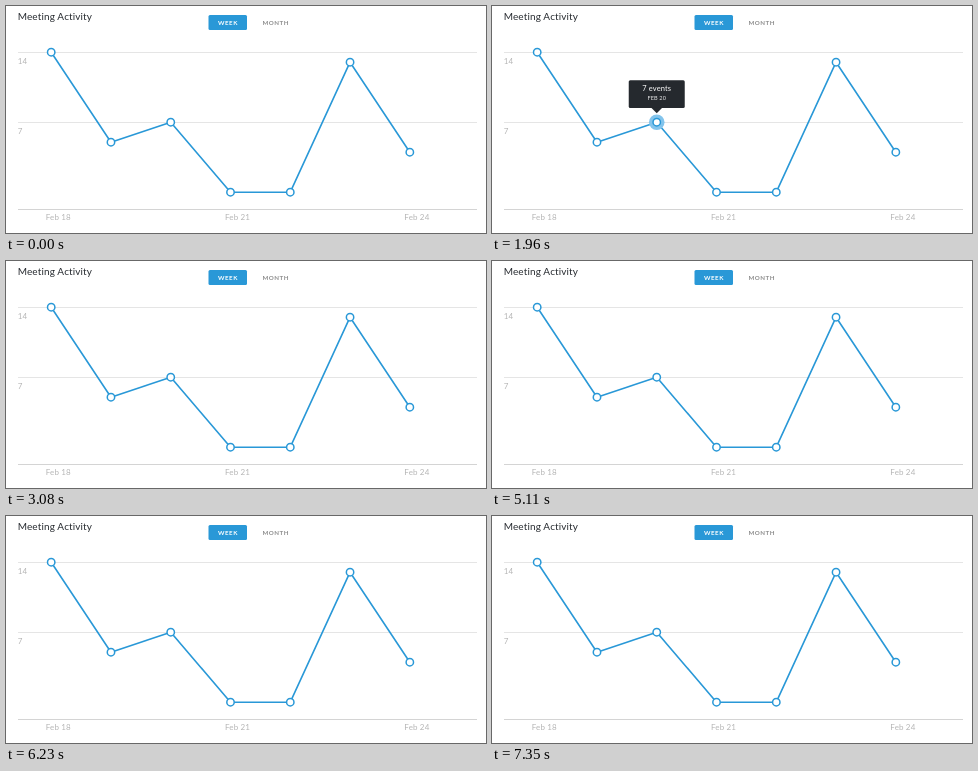
Animation of 480 by 227 pixels, one loop 8000 ms. Source, as an HTML page:

```html
<!DOCTYPE html>
<html lang="en">
<head>
<meta charset="utf-8">
<title>Meeting Activity</title>
<style>
  html, body { margin: 0; width: 100%; height: 100%; overflow: hidden; background: #fff; }
  svg { display: block; width: 480px; height: 227px; font-family: Lato, "Open Sans", sans-serif; }
  .title { font-size: 10px; fill: #282c31; letter-spacing: .13px; }
  .label { font-size: 8px; fill: #b5b5b5; letter-spacing: .15px; }
  .tab { font-size: 6.2px; font-weight: 700; text-anchor: middle; letter-spacing: .5px; }
  .grid { stroke: #e5e5e5; }
  .line { fill: none; stroke: #2998d7; stroke-width: 1.6; stroke-linejoin: round; }
  .dot { fill: #fff; stroke: #2998d7; stroke-width: 1.5; }
  .tip text { fill: #fff; text-anchor: middle; }
  .count { font-size: 7.5px; letter-spacing: .1px; }
  .date { font-size: 5.6px; letter-spacing: .1px; opacity: .9; }
</style>
</head>
<body>
<svg viewBox="0 0 480 227">
  <text class="title" x="11.7" y="13.5">Meeting Activity</text>
  <rect x="202.5" y="9" width="38.5" height="15" rx="1.5" fill="#2998d7"/>
  <text class="tab" x="222" y="18.8" fill="#fff">WEEK</text>
  <text class="tab" x="269.7" y="18.8" fill="#8c8c8c">MONTH</text>
  <path class="grid" d="M12 46.5H471M12 116.5H471"/>
  <path d="M12 203.5H471" stroke="#d4d4d4"/>
  <g id="labels"></g>
  <g id="chart"></g>
  <g id="tip" class="tip"></g>
</svg>
<script>
  const LOOP = 8000;
  const values = [14, 5, 7, 0, 0, 13, 4];
  const hovers = [
    { from: 1960, to: 3080, day: 2 },
    { from: 4200, to: 5110, day: 3 },
    { from: 6440, to: 7350, day: 5 }
  ];
  const byId = id => document.getElementById(id);
  const points = values.map((value, day) => ({ x: 45.2 + day * 59.77, y: 186.2 - value * 10 }));
  const label = (x, y, text) => `<text class="label" x="${x}" y="${y}">${text}</text>`;

  byId("labels").innerHTML = label(11.7, 57.8, 14) + label(11.7, 127.8, 7) +
    [0, 3, 6].map(day => label(39.7 + day * 59.77, 214.2, `Feb ${18 + day}`)).join("");

  byId("chart").innerHTML =
    `<polyline class="line" points="${points.map(p => `${p.x},${p.y}`).join(" ")}"/>` +
    points.map(p => `<circle class="dot" cx="${p.x}" cy="${p.y}" r="3.7"/>`).join("");

  function tooltip(day) {
    const { x, y } = points[day];
    return `<g transform="translate(${x} ${y})">
      <circle r="7.8" fill="#83c4ec"/>
      <circle class="dot" r="3.7"/>
      <rect x="-28" y="-42" width="56" height="27.8" rx="1.5" fill="#25292e"/>
      <path d="M-5.5 -14.5H5.5L0 -9Z" fill="#25292e"/>
      <text class="count" y="-31.4">${values[day]} events</text>
      <text class="date" y="-22.2">FEB ${18 + day}</text>
    </g>`;
  }

  let shown;
  function draw(now) {
    const time = now % LOOP;
    const hover = hovers.find(h => time >= h.from && time < h.to);
    if (hover !== shown) {
      byId("tip").innerHTML = hover ? tooltip(hover.day) : "";
      shown = hover;
    }
    requestAnimationFrame(draw);
  }
  requestAnimationFrame(draw);
</script>
</body>
</html>
```
